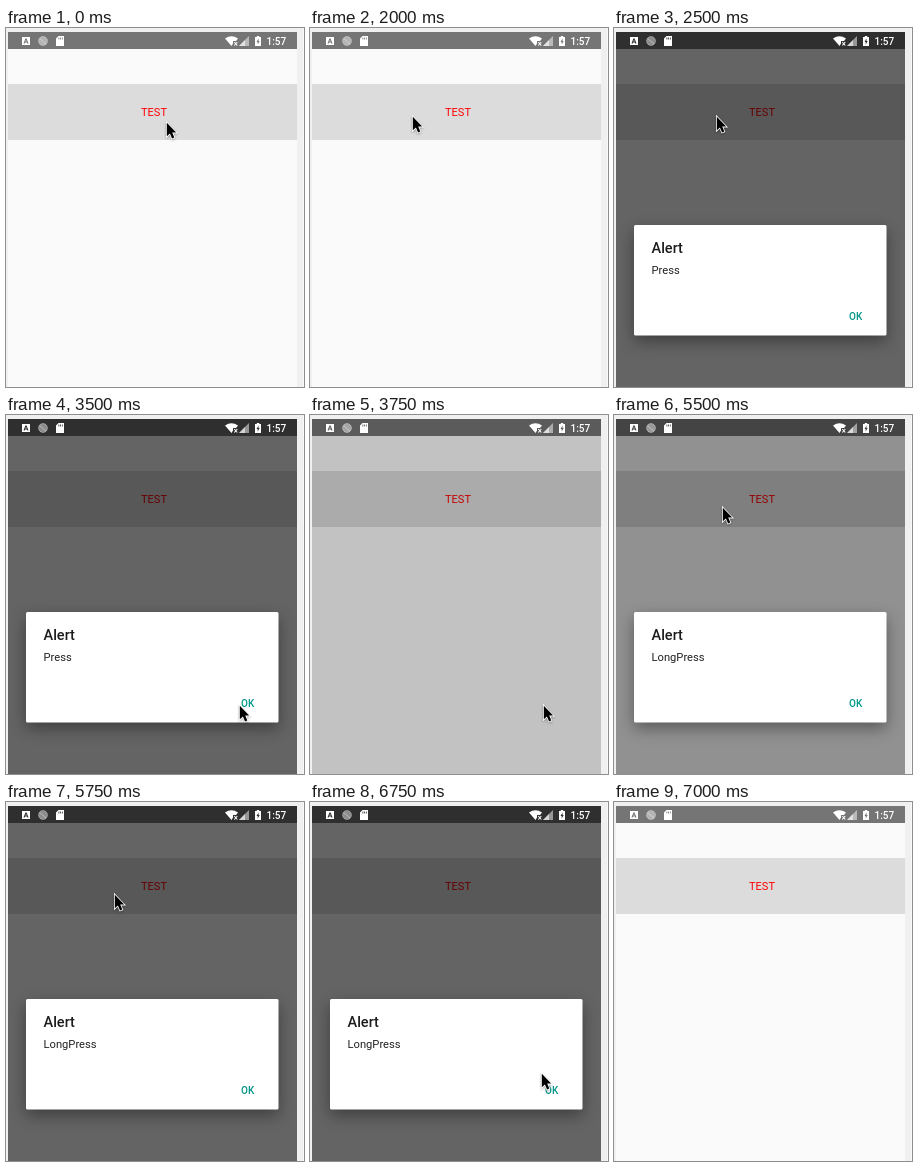
These frames come from a looping animation (298 by 359 pixels, 7500 ms). An HTML page:

```html
<!DOCTYPE html>
<html lang="en">
<head>
<meta charset="utf-8">
<style>
  html, body { margin: 0; width: 100%; height: 100%; overflow: hidden; background: #f0f0f1; }
  svg { display: block; width: 298px; height: 359px; font-family: Roboto, sans-serif; }
  #dialog rect { filter: drop-shadow(0 6px 8px rgba(0, 0, 0, .38)); }
  #cursor { filter: drop-shadow(0 1px 1px rgba(0, 0, 0, .3)); }
</style>
</head>
<body>
<svg viewBox="0 0 298 359">
  <rect x="297" width="1" height="359" fill="#f9f9f9"/>
  <rect x="2" y="4" width="289" height="355" fill="#fafafb"/>
  <rect x="2" y="56" width="289" height="56" fill="#dcdcdc"/>
  <text x="148" y="88" font-size="11" text-anchor="middle" fill="red">TEST</text>
  <rect x="2" y="4" width="289" height="17" fill="#757575"/>
  <rect id="shade" x="2" y="4" width="289" height="355"/>

  <g id="status" fill="#fff">
    <path fill-rule="evenodd" d="M16 9h8v8h-8zM17.5 15.5h1.2l.4-1.1h1.8l.4 1.1h1.2l-1.9-5h-1.2zM19.4 13.4l.6-1.7.6 1.7z"/>
    <circle cx="37" cy="13" r="4.5" fill-opacity=".45" stroke="#fff" stroke-opacity=".3"/>
    <path d="M33.5 10.5L40 16" stroke="#fff" stroke-opacity=".4"/>
    <path fill-rule="evenodd" d="M52.5 8H58v10h-8v-7.5zM52.5 9.5v2h.8v-2zM54.2 9.5v2h.8v-2zM55.9 9.5v2h.8v-2z"/>
    <path d="M219 10.5Q225.5 6 232 10.5L230 13H227V15.5L225.5 18z"/>
    <path d="M228.3 14l3 3.5m0-3.5l-3 3.5" stroke="#fff" stroke-width="1.1"/>
    <path d="M243 8v10h-10z" fill-opacity=".5"/>
    <path d="M239 12v6h-6z" fill-opacity=".6"/>
    <path fill-rule="evenodd" d="M249 9h1.8V8h2.4v1H255v9h-6zM252.5 10.5l-2 3.5h1.2v2.5l2-3.5h-1.2z"/>
    <text x="260.5" y="16.5" font-size="10" font-weight="500">1:57</text>
  </g>

  <g id="dialog">
    <rect x="20" y="197" width="252.5" height="110.5" rx="1.5" fill="#fff"/>
    <text x="37.5" y="225" font-size="14.5" font-weight="500" fill="#1c1c1c">Alert</text>
    <text id="message" x="37.5" y="246" font-size="11.2" fill="#222"></text>
    <text x="235" y="292" font-size="10" font-weight="500" fill="#009688">OK</text>
  </g>

  <path id="cursor" d="M.8 .8V14.3L3.9 11.4 6.1 16.5 8.3 15.5 6.2 10.6H10.2Z"
    stroke="#fff" stroke-width="1.6" paint-order="stroke"/>
</svg>
<script>
const LOOP = 7500, STEP = 250, FADE = 240, DIM = 0.6, LEAVE = 7000;
const $ = id => document.getElementById(id);
const clamp = u => Math.min(1, Math.max(0, u));

// Slow at both ends, fast in the middle
const ease = u => u ** 2.4 / (u ** 2.4 + (1 - u) ** 2.4);

const dialogs = [
  { open: 2260, close: 3600, message: 'Press' },
  { open: 5330, close: 6755, message: 'LongPress' }
];

// Each move of the pointer: start, end, goal
const home = [160, 94];
const moves = [
  [0, 750, 98, 77], [1750, 2000, 102, 88],
  [2475, 3000, 275, 341], [3000, 3250, 228, 295], [3250, 3500, 233, 290],
  [3750, 4450, 108, 92],
  [5725, 6250, 253, 307], [6250, 6750, 231, 271]
];

function pointer(t) {
  let [x, y] = home;
  for (const [from, to, goalX, goalY] of moves) {
    const u = ease(clamp((t - from) / (to - from)));
    x += (goalX - x) * u;
    y += (goalY - y) * u;
  }
  return [Math.round(x), Math.round(y)];
}

const dimming = (t, { open, close }) =>
  DIM * (clamp((t - open) / FADE) - clamp((t - close) / FADE));

function draw(now) {
  const t = Math.floor(now % LOOP / STEP) * STEP;
  const shown = dialogs.find(d => t >= d.open && t < d.close);
  $('shade').setAttribute('opacity', dialogs.reduce((sum, d) => sum + dimming(t, d), 0));
  $('dialog').style.display = shown ? '' : 'none';
  $('message').textContent = shown ? shown.message : '';
  $('cursor').style.display = t < LEAVE ? '' : 'none';
  $('cursor').setAttribute('transform', `translate(${pointer(t)})`);
}

const start = performance.now();
function tick() {
  draw(performance.now() - start);
  requestAnimationFrame(tick);
}
tick();
</script>
</body>
</html>
```
